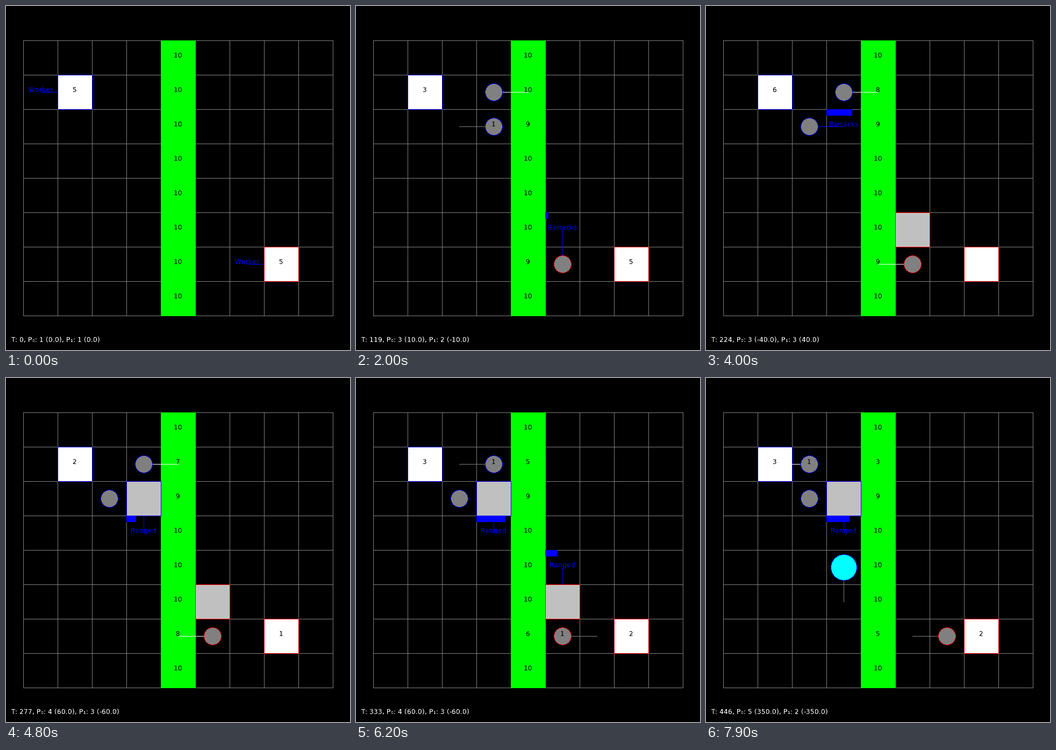
Recreate the animation shown at these times as an HTML page with a canvas. Size 640 by 640 pixels, loop 8 s.

```html
<!DOCTYPE html>
<html lang="en">
<head>
<meta charset="utf-8">
<title>Grid strategy match</title>
<style>
  html, body { margin: 0; width: 100%; height: 100%; overflow: hidden; background: #000; }
  canvas { display: block; width: 640px; height: 640px; }
</style>
</head>
<body>
<canvas id="stage" width="640" height="640"></canvas>
<script>
const ctx = document.getElementById('stage').getContext('2d');
const LOOP = 8000, STEP = 100;
const CELL = 64, LEFT = 32, TOP = 64, COLS = 9, ROWS = 8, WELL = 4;
const GRAY = '#808080', WHITE = '#ffffff', BLUE = '#0000ff', RED = '#ff0000';
const FONT = '12px "DejaVu Sans", sans-serif';

// Key points of the uneven game clock: [picture, tick]
const CLOCK = [[0, 0], [13, 65], [18, 99], [20, 119], [32, 179], [36, 197],
  [48, 277], [62, 333], [79, 446]];

// What each kind of order costs, pays and looks like.
const ORDERS = {
  m: { time: 10, color: GRAY, move: 1 },
  h: { time: 20, color: WHITE, score: 10, harvest: 1 },
  b: { time: 10, color: WHITE, score: 10, stock: 1 },
  a: { time: 5, color: RED, score: 50 },
  W: { time: 50, color: BLUE, score: 20, stock: -1, label: 'Worker' },
  B: { time: 100, color: BLUE, score: 100, stock: -5, label: 'Barracks' },
  R: { time: 100, color: BLUE, score: 40, stock: -2, label: 'Ranged' }
};
const DIRS = { l: [-1, 0], r: [1, 0], u: [0, -1], d: [0, 1], x: [2, 2] };

const HAUL_R = 'mr hr ml bl ', HAUL_L = 'ml hl mr br ';

// A plan lists order + direction; a bare number waits that many ticks.
const UNITS = [
  unit('base', 0, 1, 1, 0, 'Wl Wr'),
  unit('base', 1, 7, 6, 0, 'Wl 340 Wl'),
  unit('worker', 0, 0, 1, 50, 'md mr mr mr hr ml ml bu mr Br'),
  unit('worker', 1, 6, 6, 50, HAUL_L + 'ml Bu hl mr br ' + HAUL_L.repeat(3), 385),
  unit('worker', 0, 2, 1, 100, HAUL_R.repeat(8)),
  unit('worker', 1, 6, 6, 440, HAUL_L),
  unit('barracks', 1, 5, 5, 210, '90 Ru', 370),
  unit('barracks', 0, 3, 2, 250, 'Rd 30 Rd'),
  unit('ranged', 0, 3, 3, 350, 'ax ax ax ax md ax 55 md')
];

function unit(kind, side, col, row, born, plan, dies = Infinity) {
  const steps = [];
  let start = born, carry = 0;
  for (const token of plan.trim().split(' ')) {
    const order = ORDERS[token[0]];
    const end = start + (order ? order.time : Number(token));
    const [dx, dy] = order ? DIRS[token[1]] : [0, 0];
    steps.push({ order, start, end, col, row, carry, to: [col + dx, row + dy] });
    if (order && order.move) { col += dx; row += dy; }
    if (order && order.harvest) carry = 1;
    if (order && order.stock > 0) carry = 0;
    start = end;
  }
  steps.push({ start, end: Infinity, col, row, carry });
  return { kind, side, born, dies, steps };
}

// Everything the orders finished by tick t have added up to.
function tally(t) {
  const sum = { stock: [5, 5], count: [0, 0], score: 0, wells: Array(ROWS).fill(10) };
  for (const { side, born, dies, steps } of UNITS) {
    if (born <= t && t < dies) sum.count[side]++;
    for (const { order, end, row } of steps) {
      if (!order || end > Math.min(t, dies)) continue;
      sum.stock[side] += order.stock || 0;
      sum.score += (side ? -1 : 1) * (order.score || 0);
      if (order.harvest) sum.wells[row]--;
    }
  }
  return sum;
}

function tickAt(i) {
  const k = Math.max(1, CLOCK.findIndex(([at]) => at >= i));
  const [i0, t0] = CLOCK[k - 1], [i1, t1] = CLOCK[k];
  return Math.round(t0 + (t1 - t0) * (i - i0) / (i1 - i0));
}

const midX = col => LEFT + CELL * col + CELL / 2;
const midY = row => TOP + CELL * row + CELL / 2;

// Glyphs sit on whole pixels with hardened edges.
const glyphs = new Map();
function glyph(ch, color) {
  const key = ch + color;
  if (glyphs.has(key)) return glyphs.get(key);
  const image = document.createElement('canvas');
  image.width = image.height = 24;
  const g = image.getContext('2d');
  g.font = FONT;
  g.fillStyle = color;
  g.fillText(ch, 4, 16);
  const pixels = g.getImageData(0, 0, 24, 24);
  for (let i = 3; i < pixels.data.length; i += 4) pixels.data[i] = (pixels.data[i] - 64) * 2;
  g.putImageData(pixels, 0, 0);
  const w = g.measureText(ch).width;
  const made = { image, advance: /[a-zP]/.test(ch) ? Math.ceil(w) : Math.round(w) };
  glyphs.set(key, made);
  return made;
}

function text(str, x, y, color, centered) {
  const run = [...String(str)].map(ch => glyph(ch, color));
  if (centered) x -= Math.floor(run.reduce((w, g) => w + g.advance, 0) / 2);
  for (const { image, advance } of run) {
    ctx.drawImage(image, x - 4, y - 16);
    x += advance;
  }
}

function line(x0, y0, x1, y1, color) {
  ctx.strokeStyle = color;
  ctx.beginPath();
  ctx.moveTo(x0 + .5, y0 + .5);
  ctx.lineTo(x1 + .5, y1 + .5);
  ctx.stroke();
}

function box(col, row, fill, edge) {
  const x = LEFT + col * CELL, y = TOP + row * CELL;
  ctx.fillStyle = fill;
  ctx.fillRect(x, y, CELL, CELL);
  ctx.strokeStyle = edge;
  ctx.strokeRect(x + .5, y + .5, CELL, CELL);
}

// Pixel circle without soft edges.
function disc(col, row, r, fill, edge) {
  const x = midX(col), y = midY(row);
  const half = i => Math.round(Math.sqrt(r * r - i * i));
  ctx.fillStyle = fill;
  for (let i = -r; i <= r; i++) ctx.fillRect(x - half(i), y + i, 2 * half(i) + 1, 1);
  ctx.fillStyle = edge;
  for (let i = -r; i <= r; i++) {
    for (const s of [-half(i), half(i)]) {
      ctx.fillRect(x + s, y + i, 1, 1);
      ctx.fillRect(x + i, y + s, 1, 1);
    }
  }
}

function drawOrder({ order, start, col, row, to }, t) {
  line(midX(col), midY(row), midX(to[0]), midY(to[1]), order.color);
  if (!order.label) return;
  if (t > start) {
    ctx.fillStyle = BLUE;
    const w = Math.floor(CELL * (t - start) / order.time) + 1;
    ctx.fillRect(LEFT + to[0] * CELL, TOP + to[1] * CELL, w, 12);
  }
  text(order.label, midX(to[0]), midY(to[1]), BLUE, true);
}

function drawUnit({ kind, side, born, dies, steps }, t, stock) {
  if (t < born || t >= dies) return;
  const step = steps.find(s => t < s.end), { col, row } = step;
  const edge = side ? RED : BLUE;
  if (step.order) drawOrder(step, t);
  if (kind === 'base') box(col, row, WHITE, edge);
  if (kind === 'barracks') box(col, row, '#c0c0c0', edge);
  if (kind === 'worker') disc(col, row, 16, GRAY, edge);
  if (kind === 'ranged') disc(col, row, 24, '#00ffff', edge);
  const amount = kind === 'base' ? stock[side] : step.carry;
  if (amount) text(amount, midX(col), midY(row), '#000000', true);
}

function draw(t) {
  const { stock, count, score, wells } = tally(t);
  ctx.fillStyle = '#000';
  ctx.fillRect(0, 0, 640, 640);

  const right = LEFT + COLS * CELL, bottom = TOP + ROWS * CELL;
  for (let x = LEFT; x <= right; x += CELL) line(x, TOP, x, bottom, GRAY);
  for (let y = TOP; y <= bottom; y += CELL) line(LEFT, y, right, y, GRAY);

  wells.forEach((left, row) => {
    box(WELL, row, '#00ff00', '#00ff00');
    text(left, midX(WELL), midY(row), '#000000', true);
  });
  for (const u of UNITS) drawUnit(u, t, stock);

  const player = (name, side, points) => `${name}: ${count[side]} (${points.toFixed(1)})`;
  text(`T: ${t}, ${player('P₀', 0, score)}, ${player('P₁', 1, 0 - score)}`, 10, 625, WHITE);
}

ctx.lineWidth = 1;
ctx.lineCap = 'square';

let shown = -1;
function play() {
  const now = Math.floor(performance.now() % LOOP / STEP);
  if (now !== shown) draw(tickAt(shown = now));
  requestAnimationFrame(play);
}
play();
</script>
</body>
</html>
```
